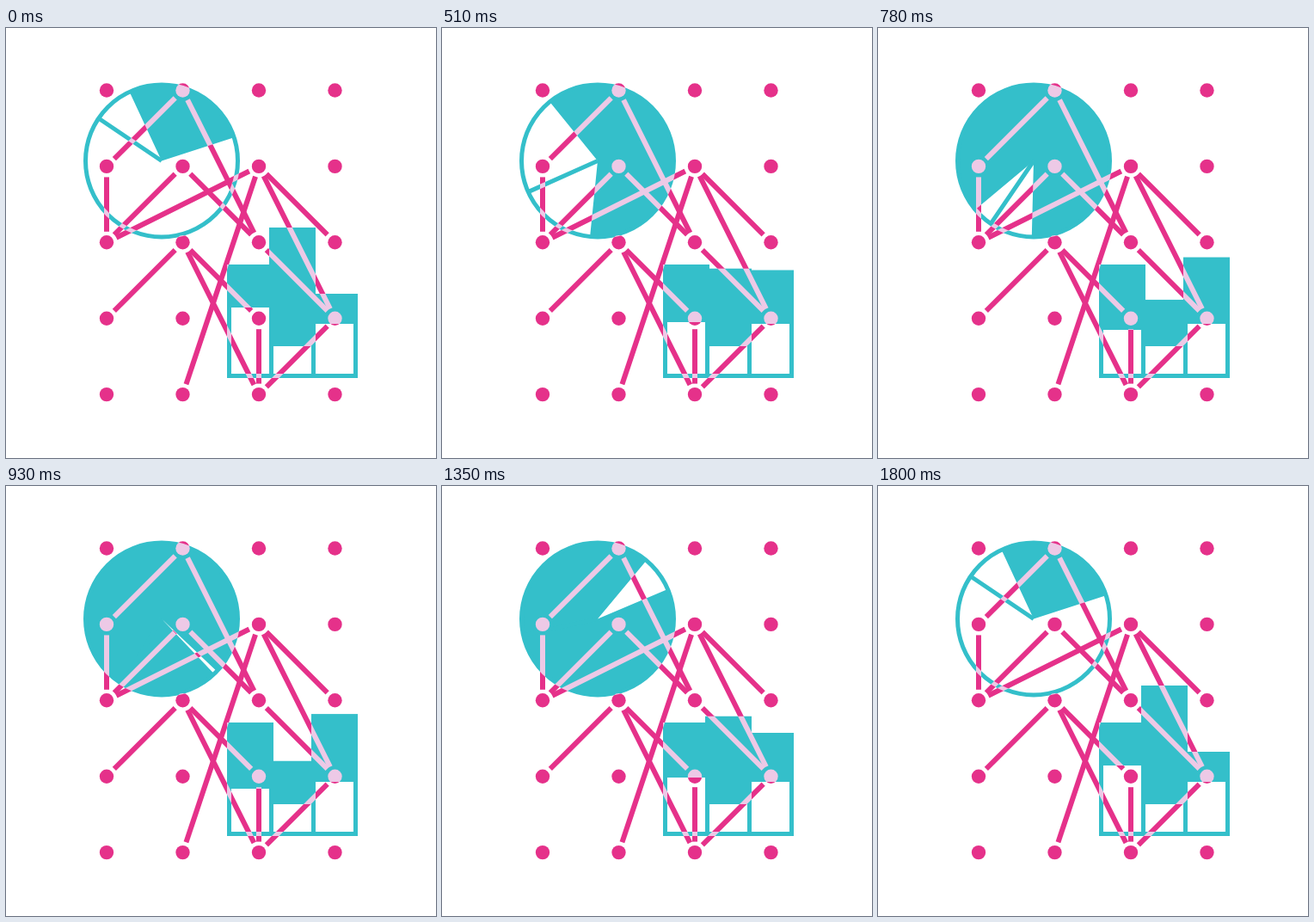
An HTML page with a canvas for the animation above (2700 ms loop, 500 by 500 pixels).

```html
<!DOCTYPE html>
<html lang="en">
<head>
<meta charset="utf-8">
<title>Charts and dots</title>
<style>
  html, body { margin: 0; width: 100%; height: 100%; overflow: hidden; background: #fff; }
  canvas { display: block; width: 500px; height: 500px; }
</style>
</head>
<body>
<canvas id="stage" width="500" height="500"></canvas>
<script>
const ctx = document.getElementById('stage').getContext('2d');
const TEAL = '#34bfca', PINK = '#e5318a', LIGHT = '#edc9e6';
const LOOP = 2700, MOVE = 1800, STEP = 30;
const PIE = { x: 181, y: 154.5, r: 88.5 };
const EDGE = 5, GAP = 12.5, DOT = 8.2;

// Chains of grid cells, each written as column and row
const CHAINS = ['02 01 10 22 11 02 21 33 24 23 12 24', '32 21 14', '22 33', '12 03']
  .map(chain => chain.split(' ').map(([col, row]) => cell(+col, +row)));

// Edges of the filled slice: time and degrees clockwise from the top
const fillEnd = track([0, 72], [640, 196], [1290, 39], [MOVE, 72]);
const fillStart = track([0, 335], [450, 324], [1250, 48], [MOVE, 335]);

function cell(col, row) {
  return { x: 117 + col * 88.5, y: 72.5 + row * 88.4 };
}

function ease(p) {
  return p < 0.5 ? 2 * p * p : 1 - 2 * (1 - p) * (1 - p);
}

function track(...keys) {
  return t => {
    const next = Math.max(1, keys.findIndex(key => key[0] >= t));
    const [t1, v1] = keys[next - 1], [t2, v2] = keys[next];
    return v1 + (v2 - v1) * ease((t - t1) / (t2 - t1));
  };
}

function radians(degrees) {
  return (degrees - 90) * Math.PI / 180;
}

function drawPie(t, swing) {
  const { x, y, r } = PIE;
  ctx.beginPath();
  ctx.moveTo(x, y);
  ctx.arc(x, y, r, radians(fillStart(t)), radians(fillEnd(t) + 360));
  ctx.fill();

  const divider = radians(304 - 93 * swing);
  ctx.lineWidth = EDGE;
  ctx.beginPath();
  ctx.arc(x, y, r, 0, Math.PI * 2);
  ctx.moveTo(x, y);
  ctx.lineTo(x + r * Math.cos(divider), y + r * Math.sin(divider));
  ctx.stroke();
}

function drawBars(swing) {
  const width = 54, bottom = 407;
  const bars = [
    { x: 257, top: 275, hole: 325 + 27 * swing },
    { x: 306, top: 232 + 88 * swing ** 1.3, hole: 370 },
    { x: 355, top: 309 - 44 * swing, hole: 344 }
  ];
  for (const { x, top } of bars) ctx.fillRect(x, top, width, bottom - top);
  for (const { x, hole } of bars) {
    ctx.clearRect(x + EDGE, hole, width - 2 * EDGE, bottom - EDGE - hole);
  }
}

function drawLink(a, b) {
  const angle = Math.atan2(b.y - a.y, b.x - a.x);
  const dx = GAP * Math.cos(angle), dy = GAP * Math.sin(angle);
  ctx.beginPath();
  ctx.moveTo(a.x + dx, a.y + dy);
  ctx.lineTo(b.x - dx, b.y - dy);
  ctx.stroke();
}

function drawMarks(color) {
  ctx.fillStyle = ctx.strokeStyle = color;
  ctx.lineWidth = 6;
  for (const chain of CHAINS) {
    for (let i = 1; i < chain.length; i++) drawLink(chain[i - 1], chain[i]);
  }
  for (let row = 0; row < 5; row++) {
    for (let col = 0; col < 4; col++) {
      const { x, y } = cell(col, row);
      ctx.beginPath();
      ctx.arc(x, y, DOT, 0, Math.PI * 2);
      ctx.fill();
    }
  }
}

function draw(t) {
  const swing = ease(1 - Math.abs(2 * t / MOVE - 1));
  ctx.globalCompositeOperation = 'source-over';
  ctx.clearRect(0, 0, 500, 500);
  ctx.fillStyle = ctx.strokeStyle = TEAL;
  drawBars(swing);
  drawPie(t, swing);
  // Marks are light over teal and pink everywhere else
  ctx.globalCompositeOperation = 'source-atop';
  drawMarks(LIGHT);
  ctx.globalCompositeOperation = 'destination-over';
  drawMarks(PINK);
}

const began = performance.now();
function tick() {
  const t = (performance.now() - began) % LOOP;
  draw(Math.min(Math.floor(t / STEP) * STEP, MOVE));
  requestAnimationFrame(tick);
}
tick();
</script>
</body>
</html>
```
